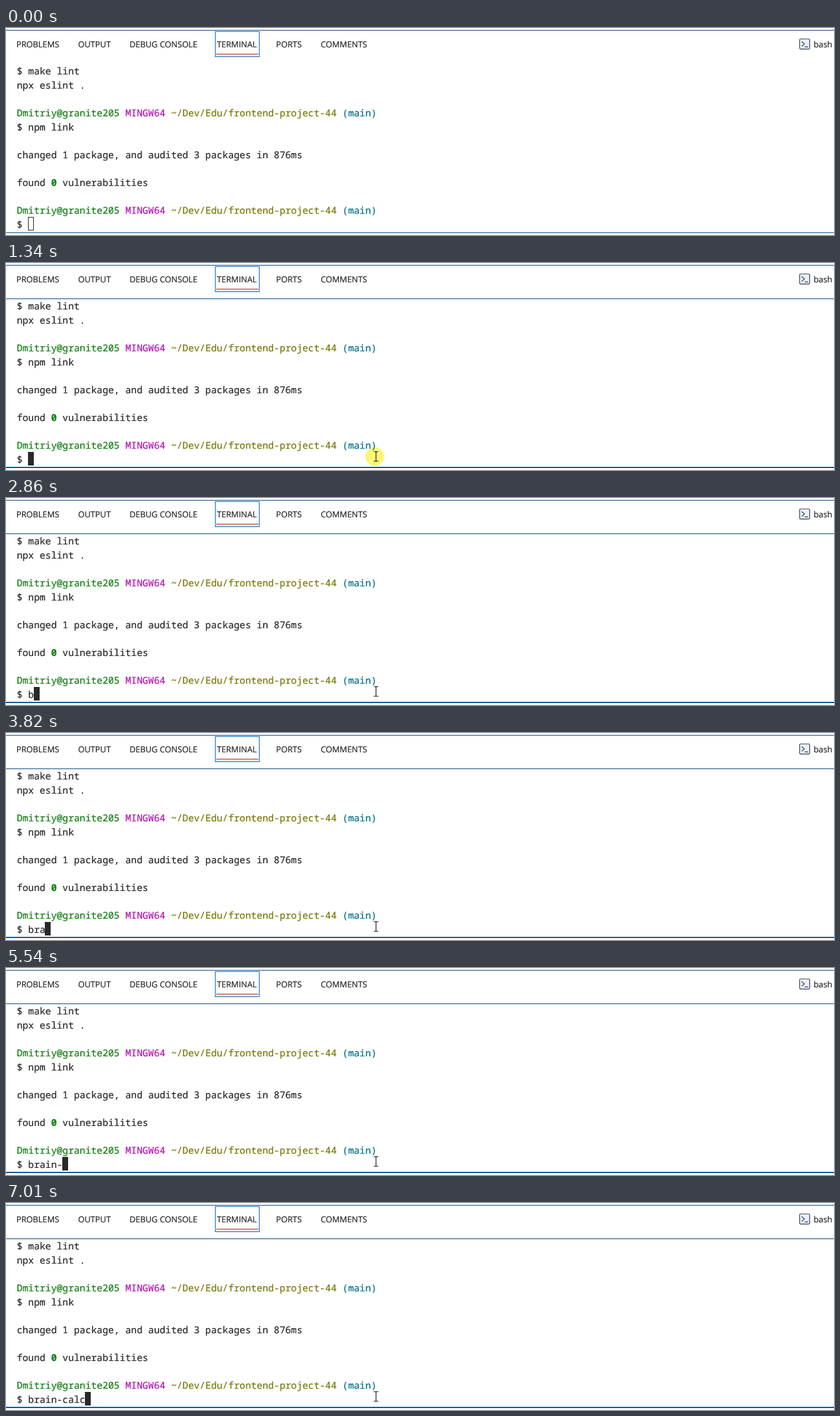
Write an HTML page that moves like this. It is 1280 by 321 pixels and loops after 8 s.

```html
<!DOCTYPE html>
<html lang="en">
<head>
<meta charset="utf-8">
<title>Terminal</title>
<style>
  html, body { margin: 0; width: 100%; height: 100%; overflow: hidden; background: #fff; }
  svg { display: block; width: 1280px; height: 321px; text-rendering: geometricPrecision; }
  text { white-space: pre; }
  tspan { color: #292929; fill: currentColor; stroke: currentColor; stroke-width: .22px; }
  #tabs text { font: 12.8px "Open Sans", "Noto Sans", sans-serif; }
  #lines text { font: 14.72px "Noto Sans Mono", "DejaVu Sans Mono", monospace; }
  .user { color: #127c12; }
  .sys { color: #b412b4; }
  .path { color: #777a08; }
  .branch { color: #04728f; }
  .count { color: #127c12; font-weight: bold; }
</style>
</head>
<body>
<svg viewBox="0 0 1280 321">
  <g fill="#0f4a85">
    <rect y="3" width="1280" height="1"/>
    <rect y="317" width="1280" height="1"/>
  </g>
  <g id="tabs"></g>
  <rect x="323.5" y="5.5" width="68" height="39" fill="none" stroke="#006bbd"/>
  <rect x="325" y="40" width="65" height="1" fill="#b5200d"/>
  <g fill="none" stroke="#34445c" stroke-width="1.2">
    <rect x="1226.8" y="17" width="15.6" height="15.6" rx="1.5" fill="#edf1f6"/>
    <path d="M1230 21l4.3 3.7l-4.3 3.7M1234.5 29.3h5.5"/>
  </g>

  <g id="focus">
    <rect y="55" width="1280" height="1" fill="#0f4a85"/>
    <rect y="316" width="1280" height="1" fill="#006bbd"/>
  </g>
  <circle id="halo" cx="570" cy="300" r="14.3" fill="#fbf674"/>
  <g id="lines"></g>
  <rect id="caret" stroke="#292929"/>
  <path id="mouse" d="M-3.5 -7.5h2.5l1 1l1 -1h2.5M0 -6.5v13M-3.5 7.5h2.5l1 -1l1 1h2.5" fill="none" stroke="#222" stroke-width="1.2"/>
</svg>
<script>
const LOOP = 8000, CELL = 8.832, LEFT = 16.7;
const $ = id => document.getElementById(id);

function addText(parent, x, y, parts) {
  const make = name => document.createElementNS("http://www.w3.org/2000/svg", name);
  const text = make("text");
  text.setAttribute("x", x);
  text.setAttribute("y", y);
  for (const [str, cls] of parts) {
    const span = make("tspan");
    span.textContent = str;
    if (cls) span.setAttribute("class", cls);
    text.append(span);
  }
  $(parent).append(text);
  return text;
}

const set = (id, attrs) => {
  for (const key in attrs) $(id).setAttribute(key, attrs[key]);
};

const tabs = { PROBLEMS: 16, OUTPUT: 111.5, "DEBUG CONSOLE": 191, TERMINAL: 326, PORTS: 417.5, COMMENTS: 486.5, bash: 1248.5 };
for (const name in tabs) addText("tabs", tabs[name], 30.3, [[name]]);

const prompt = [
  ["Dmitriy@granite205 ", "user"], ["MINGW64 ", "sys"],
  ["~/Dev/Edu/frontend-project-44 ", "path"], ["(main)", "branch"]
];
const rows = [
  [["$ make lint"]], [["npx eslint ."]], [],
  prompt, [["$ npm link"]], [],
  [["changed 1 package, and audited 3 packages in 876ms"]], [],
  [["found "], ["0", "count"], [" vulnerabilities"]], [],
  prompt, [["$ "]]
];
const input = rows.map((row, i) => addText("lines", LEFT, 72.3 + 21.6 * i, row)).pop();

const command = "brain-calc";
const keyTimes = [2860, 3090, 3820, 4280, 4410, 5540, 5810, 6070, 6200, 7010];

// Mouse samples: time, x, y
const moves = [
  [510, 1200, 312], [580, 1040, 299], [650, 880, 286],
  [720, 745, 280], [790, 655, 284], [860, 606, 293.5],
  [940, 585, 298], [1010, 576, 300], [1080, 572, 300]
];

function render(t) {
  const focused = t >= 1340;
  const typed = keyTimes.filter(k => t >= k).length;
  input.firstChild.textContent = "$ " + command.slice(0, typed);

  set("caret", {
    x: Math.round(34 + typed * CELL) + 0.5, y: 293.5, width: 8, height: 20,
    fill: focused ? "#292929" : "none"
  });
  set("focus", { opacity: focused ? 1 : 0 });
  set("halo", { opacity: !focused || t >= 1600 ? 0 : t < 1470 ? 1 : 0.5 });

  const spot = moves.filter(m => t >= m[0]).pop();
  set("mouse", spot
    ? { opacity: 1, transform: `translate(${spot[1]} ${spot[2]})` }
    : { opacity: 0 });
}

const start = performance.now();
function tick() {
  render((performance.now() - start) % LOOP);
  requestAnimationFrame(tick);
}
tick();
</script>
</body>
</html>
```
